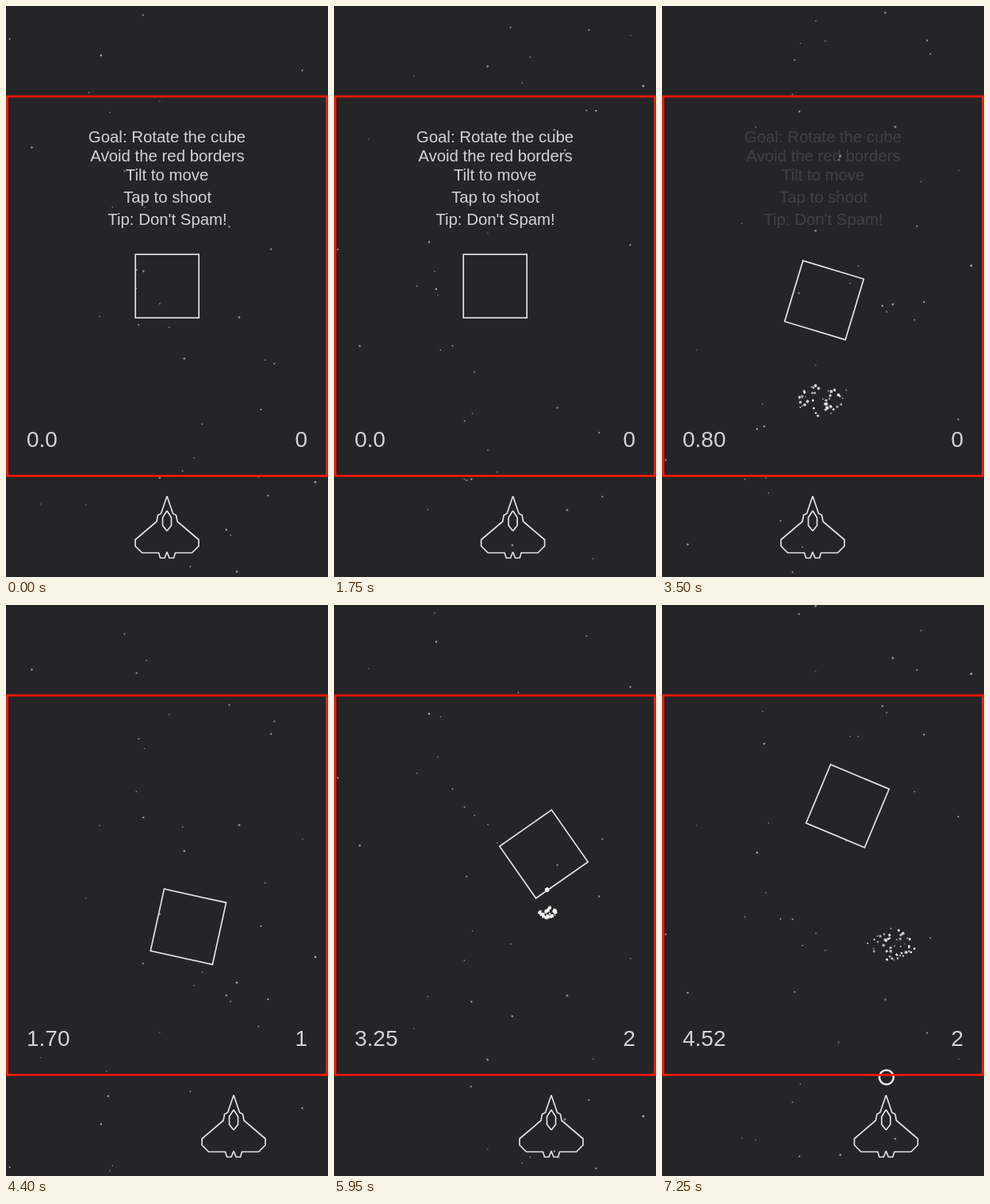
Write an HTML page with a canvas that moves like this. It is 406x720 px and loops after 7.3 s.

```html
<!DOCTYPE html>
<html lang="en">
<head>
<meta charset="utf-8">
<title>Rotate the cube</title>
<style>
  html, body { margin: 0; width: 100%; height: 100%; overflow: hidden; background: #252427; }
  canvas, svg { position: absolute; left: 0; top: 0; width: 406px; height: 720px; }
  text { font-family: "Liberation Sans", Arial, sans-serif; fill: #d3d2d4; }
  #help text { font-size: 20.4px; text-anchor: middle; }
  .count { font-size: 28px; }
  .line { fill: none; stroke: #e2e1e3; stroke-width: 1.7; }
</style>
</head>
<body>
<canvas id="sky" width="406" height="720"></canvas>
<svg viewBox="0 0 406 720">
  <g id="help">
    <text x="203" y="172">Goal: Rotate the cube</text>
    <text x="203.5" y="196">Avoid the red borders</text>
    <text x="203" y="220">Tilt to move</text>
    <text x="203.5" y="248">Tap to shoot</text>
    <text x="203.5" y="276">Tip: Don't Spam!</text>
  </g>
  <text id="time" class="count" x="26" y="556">0.0</text>
  <text id="score" class="count" x="380" y="556" text-anchor="end">0</text>
  <rect id="cube" class="line" x="-40" y="-40" width="80" height="80"/>
  <g id="ship" class="line">
    <path id="half" d="M0 618 L7.5 640 L11.5 642 L13 650 L40 673 V681 L31.5 689.5 H10.5 L8.5 696 H3 L0 688.5 M0 636.5 L5.5 645 V655 L0 662"/>
    <use href="#half" transform="scale(-1 1)"/>
  </g>
  <rect x="1.5" y="114" width="403" height="478.5" fill="none" stroke="#fa1808" stroke-width="2.7"/>
</svg>
<script>
const W = 406, H = 720, LOOP = 7300, STEP = 50;
const START = 2700;       // first tap: clock runs, help fades
const BULLET_SPEED = 0.9; // px per ms
const MUZZLE = 604, REACH = 45;
const FALL = 137, GRAVITY = 848, DRIFT = 25; // sparks, per second

const el = id => document.getElementById(id);
const ctx = el('sky').getContext('2d');
const [help, time, score, cube, ship] = ['help', 'time', 'score', 'cube', 'ship'].map(el);

function seeded(a) {
  return () => {
    a = a + 0x6D2B79F5 | 0;
    let n = Math.imul(a ^ a >>> 15, 1 | a);
    n = n + Math.imul(n ^ n >>> 7, 61 | n) ^ n;
    return ((n ^ n >>> 14) >>> 0) / 4294967296;
  };
}
const rnd = seeded(7);
const between = (a, b) => a + (b - a) * rnd();
const make = (length, fn) => Array.from({ length }, fn);

// Key points: time, then values
const shipKeys = [[0, 203], [1000, 193], [2450, 255], [2900, 190], [3500, 190],
                  [4750, 310], [5350, 265.5], [6550, 282.5]];
const cubeKeys = [[3150, 203.2, 353.2, 0], [3500, 204.5, 371, 16.8], [4900, 244, 425, 150],
                  [5350, 266, 345.5, 211.5], [6550, 263, 282.7, 258.6],
                  [6900, 257, 283, 265], [7250, 234, 253.5, 202.7]];
const hitTimes = [3150, 4900, 5830, 5950, 6900, 7580];

const linear = k => k;
const smooth = k => k * k * (3 - 2 * k);

function sample(keys, t, ease) {
  const i = keys.findIndex(k => k[0] > t);
  if (i <= 0) return keys.at(i).slice(1);
  const a = keys[i - 1], b = keys[i], k = ease((t - a[0]) / (b[0] - a[0]));
  return a.slice(1).map((v, j) => v + (b[j + 1] - v) * k);
}
const shipAt = t => sample(shipKeys, t, smooth)[0];
const cubeAt = t => sample(cubeKeys, t, linear);

const stars = make(42, () => ({
  x: between(0, W), y: between(0, H), v: between(95, 153),
  r: between(0.7, 1.4), light: between(0.4, 0.75)
}));

const shots = hitTimes.map(hit => {
  const y = cubeAt(hit)[1] + REACH;
  const fired = hit - (MUZZLE - y) / BULLET_SPEED;
  const sparks = make(44, () => {
    const a = between(0, Math.PI * 2), v = Math.sqrt(rnd());
    return { vx: DRIFT + Math.cos(a) * v * 92, vy: FALL + Math.sin(a) * v * 60,
             size: between(1.2, 3.8), turn: between(0, 3), light: between(0.5, 1.1) };
  });
  return { hit, fired, x: shipAt(fired), y, sparks };
});

function drawStar({ x, y, v, r, light }, t) {
  ctx.globalAlpha = light;
  ctx.beginPath();
  ctx.arc(x, (y + v * t / 1000) % (H + 6) - 3, r, 0, 7);
  ctx.fill();
}

function drawBullet({ x, fired }, t) {
  ctx.beginPath();
  ctx.arc(x + 0.5, MUZZLE - (t - fired) * BULLET_SPEED, 9, 0, 7);
  ctx.stroke();
}

function drawSparks({ hit, x, y, sparks }, t) {
  const s = (t - hit) / 1000, fade = Math.max(0, 1.15 - s * 0.5);
  for (const p of sparks) {
    const size = p.size * fade;
    ctx.save();
    ctx.globalAlpha = Math.min(1, p.light * fade);
    ctx.translate(x + p.vx * s, y + p.vy * s + GRAVITY * s * s / 2);
    ctx.rotate(p.turn + s * 2);
    ctx.fillRect(-size / 2, -size / 2, size, size);
    ctx.restore();
  }
}

function render(t) {
  ctx.clearRect(0, 0, W, H);
  ctx.fillStyle = '#d6d5d7';
  stars.forEach(s => drawStar(s, t));
  ctx.globalAlpha = 1;
  ctx.fillStyle = '#fff';
  ctx.strokeStyle = '#e8e7e9';
  ctx.lineWidth = 2.6;
  for (const shot of shots) {
    if (t >= shot.hit) drawSparks(shot, t);
    else if (t >= shot.fired) drawBullet(shot, t);
  }

  const [x, y, angle] = cubeAt(t);
  cube.setAttribute('transform', `translate(${x} ${y}) rotate(${angle})`);
  ship.setAttribute('transform', `translate(${shipAt(t)} 0)`);
  help.setAttribute('opacity', Math.max(0, Math.min(1, 1 - (t - START) / 950)));

  // the clock lags slightly near the end
  const elapsed = t - START - Math.max(0, t - 6550) * 0.043;
  time.textContent = elapsed > 0 ? (elapsed / 1000).toFixed(2) : '0.0';
  score.textContent = Math.floor(angle / 90);
}

const begin = performance.now();
function frame() {
  const t = (performance.now() - begin) % LOOP;
  render(Math.floor(t / STEP) * STEP);
  requestAnimationFrame(frame);
}
frame();
</script>
</body>
</html>
```
